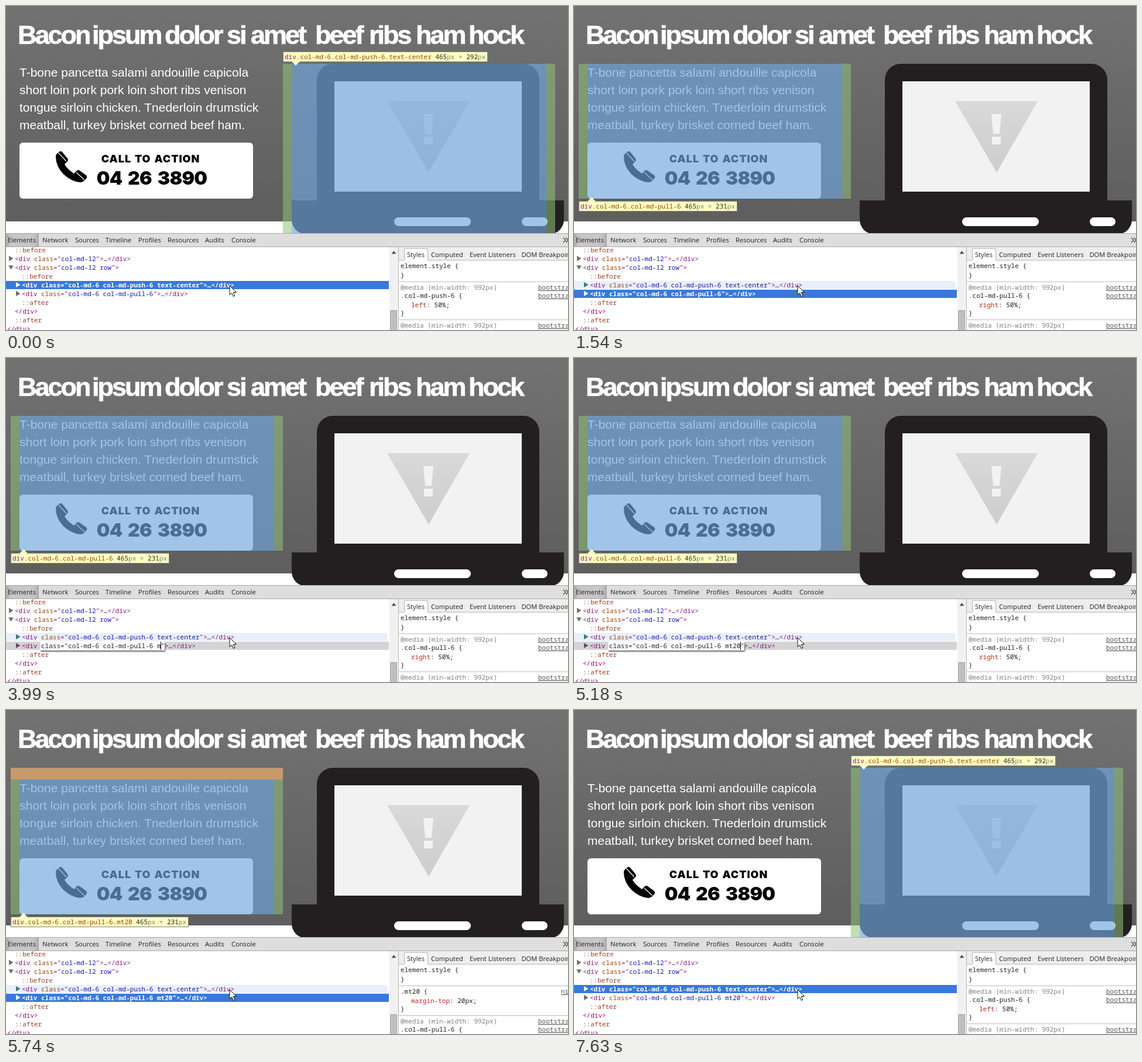
Write an HTML page that moves like this. It is 960 by 555 pixels and loops after 8000 ms.

```html
<!DOCTYPE html>
<html lang="en">
<head>
<meta charset="utf-8">
<title>Editing a class in the inspector</title>
<style>
  html, body { margin: 0; width: 100%; height: 100%; overflow: hidden; background: #fff; }
  svg { display: block; width: 960px; height: 555px; }
  text { white-space: pre; font-kerning: none; }
  .title { font: bold 45px "Liberation Sans", Arial, sans-serif; letter-spacing: -3px; fill: #fff; stroke: #fff; stroke-width: .7px; }
  .copy { font: 21px "Liberation Sans", Arial, sans-serif; fill: #fff; }
  .call { font: 900 18px Inter, "Liberation Sans", sans-serif; letter-spacing: .9px; word-spacing: 1.5px; text-anchor: middle; }
  .phone { font: 900 32px Inter, "Liberation Sans", sans-serif; letter-spacing: -.7px; word-spacing: 4px; text-anchor: middle; }
  .ui { font: 11.15px "Open Sans", "Noto Sans", sans-serif; fill: #222; }
  .mono { font: 11px "Noto Sans Mono", "DejaVu Sans Mono", monospace; fill: #222; }
  .bold { font-weight: bold; }
  .link { text-decoration: underline; fill: #555; }
</style>
</head>
<body>
<svg viewBox="0 0 960 555" xmlns="http://www.w3.org/2000/svg">
  <defs>
    <linearGradient id="hero" x2="0" y2="1"><stop stop-color="#727272"/><stop offset="1" stop-color="#5e5e5e"/></linearGradient>
    <linearGradient id="warn" x2="0" y2="1"><stop stop-color="#d9d9d9"/><stop offset="1" stop-color="#cdcdcd"/></linearGradient>
    <linearGradient id="tab">
      <stop stop-color="#a8a8a8"/><stop offset=".14" stop-color="#c6c6c6"/>
      <stop offset=".86" stop-color="#c6c6c6"/><stop offset="1" stop-color="#a8a8a8"/>
    </linearGradient>
    <filter id="shadow" x="-10%" y="-50%" width="120%" height="220%">
      <feDropShadow dx="1" dy="2" stdDeviation="1.3" flood-color="#000" flood-opacity=".6"/>
    </filter>
  </defs>

  <rect width="960" height="555" fill="#fff"/>
  <rect width="960" height="369" fill="url(#hero)"/>
  <g id="title"></g>

  <g fill="#231f20">
    <path d="M531 340V126a27 27 0 0 1 27-27H884a27 27 0 0 1 27 27V340z"/>
    <path d="M488 333H953V366a25 25 0 0 1-25 25H513a25 25 0 0 1-25-25z"/>
  </g>
  <rect x="561" y="129" width="320" height="189" fill="#f2f2f2"/>
  <path d="M651 163H792L722 285z" fill="url(#warn)"/>
  <path d="M713 185h17l-3 34h-11zM714 224h15v13h-15z" fill="#f2f2f2"/>
  <g fill="#fff">
    <rect x="663" y="362" width="131" height="15" rx="7.5"/>
    <rect x="881" y="362" width="44" height="15" rx="7.5"/>
  </g>

  <g id="column">
    <g id="copy"></g>
    <rect x="23" y="234" width="399" height="96" rx="6" fill="#fff"/>
    <path d="M92 249q2-1 4 1l9 11q2 3 0 5l-5 5q4 8 16 16l5-5q2-2 5 0l11 8q2 2 1 4-5 8-11 8-15-1-29-14-13-14-13-30 0-5 7-9z"/>
    <path d="M89 251l14 15M120 285l14 13" stroke="#fff" stroke-width="1.2"/>
    <text class="call" x="247" y="268">CALL TO ACTION</text>
    <text class="phone" x="249" y="306">04 26 3890</text>
  </g>

  <g id="overlay"></g>

  <rect y="389" width="960" height="166" fill="#fff"/>
  <rect y="389" width="960" height="24" fill="#dedede"/>
  <rect y="390" width="56" height="22" fill="url(#tab)"/>
  <path d="M0 389.5H960M0 412.5H960" stroke="#a8a8a8"/>
  <path d="M952 397l4 4-4 4M956.500 397l4 4-4 4" fill="none" stroke="#555" stroke-width="1.6"/>
  <g id="tabs"></g>

  <g id="tree"></g>

  <rect x="655" y="413" width="15" height="142" fill="#f1f1f1"/>
  <path d="M658.500 424.500l4-5 4 5z" fill="#505050"/>
  <rect x="656.500" y="521.500" width="11" height="40" fill="#bfbfbf" stroke="#a9a9a9"/>
  <rect x="671" y="413" width="289" height="23" fill="#eee"/>
  <path d="M670.500 413V555M671 435.500H960" stroke="#b5b5b5"/>
  <path d="M680.500 436V415.500H720.500V436" fill="#fff" stroke="#b5b5b5"/>
  <g id="sideTabs"></g>
  <g id="styles"></g>

  <path d="M382 479v16l3.700-3.500 2.600 6 2.600-1.100-2.600-5.900h5.200z" fill="#fff" stroke="#111" stroke-linejoin="round"/>
</svg>

<script>
const LOOP = 8000, CHAR = 6.6;
const INK = '#222', TAG = '#881280', NAME = '#994500', VALUE = '#1a1aa6';
const PSEUDO = '#a0452a', GREY = '#808080', PROP = '#b82a1c';

const $ = id => document.getElementById(id);
const esc = s => s.replace(/&/g, '&amp;').replace(/</g, '&lt;');
const rect = (x, y, w, h, fill, more = '') =>
  `<rect x="${x}" y="${y}" width="${w}" height="${h}" fill="${fill}" ${more}/>`;
const shape = (d, fill) => `<path d="${d}" fill="${fill}"/>`;
const label = (x, y, s, cls) => `<text class="${cls}" x="${x}" y="${y}">${esc(s)}</text>`;
const mono = (x, y, parts, cls = '') => `<text class="mono ${cls}" x="${x}" y="${y}">` +
  parts.map(([s, color]) => `<tspan fill="${color}">${esc(s)}</tspan>`).join('') + '</text>';
const labels = (list, y, cls) => list.map(([x, str]) => label(x, y, str, cls)).join('');

// Each step changes some fields of the state and holds until the next.
const steps = [
  [0, { push: 'sel', pull: 'plain', over: 'push', css: 'push', extra: '', shift: 0, caret: 0 }],
  [1470, { push: 'hover', pull: 'sel' }],
  [1540, { over: 'pull', css: 'pull' }],
  [2730, { pull: 'edit', marked: 1 }],
  [3010, { marked: 0, caret: 1 }],
  [3500, { caret: 0 }],
  [3640, { extra: ' ', caret: 1 }],
  [3990, { extra: ' m' }],
  [4270, { extra: ' mt' }],
  [4760, { caret: 0 }],
  [5040, { extra: ' mt2', caret: 1 }],
  [5180, { extra: ' mt20' }],
  [5670, { pull: 'sel', caret: 0, shift: 20 }],
  [5740, { css: 'mt' }],
  [7560, { push: 'sel', pull: 'plain', over: 'push' }],
  [7630, { css: 'push' }]
];

function tooltip(x, y, classes, height, tip) {
  const width = Math.round((classes.length + 17) * CHAR) + 7;
  return rect(x + .5, y + .5, width - 1, 17, '#ffffc2', 'stroke="#808080"') +
    shape(tip, '#ffffc2') +
    mono(x + 3, y + 13, [['div', TAG], [classes, NAME], [' 465', INK], ['px × ', GREY],
      [String(height), INK], ['px', GREY]]);
}

function overlay(s) {
  const push = s.over === 'push';
  const x = push ? 473 : 8, y = push ? 99 : 99 + s.shift, h = push ? 292 : 231;
  const green = 'rgba(147,196,125,.55)';
  let out = rect(x, y, 15, h, green) + rect(x + 450, y, 15, h, green) +
    rect(x + 15, y, 435, h, 'rgba(111,168,220,.66)');
  if (push) return out + tooltip(473, 78, '.col-md-6.col-md-push-6.text-center', 292, 'M488 95h14l-7 7z');
  if (s.shift) out += rect(8, 99, 465, s.shift, 'rgba(246,178,107,.66)');
  // The page takes the typed class only once the edit is committed.
  const classes = '.col-md-6.col-md-pull-6' + (s.shift ? '.mt20' : '');
  return out + tooltip(8, 334 + s.shift, classes, 231, `M23 ${335 + s.shift}h14l-7-8z`);
}

function openTag(x, y, value, closed, white) {
  const c = color => white ? '#fff' : color;
  const parts = [['<div ', c(TAG)], ['class', c(NAME)], ['="', c(TAG)], [value, c(VALUE)], ['">', c(TAG)]];
  if (closed) parts.push(['…', c(INK)], ['</div>', c(TAG)]);
  return mono(x, y, parts, white ? 'bold' : '');
}

function row(y, value, mode) {
  const back = {
    sel: rect(0, y, 654, 14, '#3879d9'),
    hover: shape(`M0 ${y}H648a4 4 0 0 1 4 4v6a4 4 0 0 1-4 4H0z`, '#e9f0fb'),
    edit: rect(0, y, 654, 14, '#d4d4d4'),
    plain: ''
  }[mode];
  const arrow = { sel: '#fff', hover: '#3f776c', edit: '#6b4273', plain: '#6e6e6e' }[mode];
  return back + shape(`M17 ${y + 2}l7.500 4.500-7.500 4.500z`, arrow) + openTag(27, y + 11, value, true, mode === 'sel');
}

function editor(value, s) {
  const width = (value.length + 8) * CHAR;
  const x = 60, y = 497, from = x + 7 * CHAR;
  let out = rect(58, 486, Math.round(width) + 2, 15, '#fff', 'filter="url(#shadow)"');
  if (s.marked) out += rect(106, 486, 145, 14, '#3390ff');
  out += mono(x, y, [['class="', INK], [value, s.marked ? '#fff' : INK], ['"', INK]]);
  if (s.caret) out += rect(Math.floor(from + value.length * CHAR), 486, 1, 14, '#000');
  return out;
}

function tree(s) {
  const value = 'col-md-6 col-md-pull-6' + s.extra;
  const pseudo = (x, y, name) => mono(x, y, [['::' + name, PSEUDO]]);
  const close = (x, y) => mono(x, y, [['</div>', TAG]]);
  return pseudo(15, 422, 'before') +
    shape('M5 428l7.500 4.500-7.500 4.500z', '#6e6e6e') + openTag(15, 437, 'col-md-12', true) +
    shape('M4 444.500h9l-4.500 7z', '#6e6e6e') + openTag(15, 452, 'col-md-12 row', false) +
    pseudo(27, 467, 'before') +
    row(471, 'col-md-6 col-md-push-6 text-center', s.push) +
    row(486, value, s.pull) +
    (s.pull === 'edit' ? editor(value, s) : '') +
    pseudo(27, 512, 'after') + close(15, 527) + pseudo(15, 542, 'after') + close(2, 557);
}

function styles(s) {
  const line = y => rect(671, y, 289, 1, '#bbb');
  const text = (x, y, str, color = INK) => mono(x, y, [[str, color]]);
  const link = (x, y, str) => label(x, y, str, 'mono link');
  const media = y => text(674, y, '@media (min-width: 992px)', GREY) + link(909, y, 'bootstrap.css');
  const decl = (y, name, val) => mono(692, y, [[name, PROP], [`: ${val};`, INK]]);
  const selector = (y, name) => text(674, y, name + ' {') + link(909, y, 'bootstrap.css');
  const head = text(674, 449, 'element.style {') + text(674, 465, '}') + line(472);
  if (s.css === 'mt') {
    return head + text(674, 486, '.mt20 {') + link(948, 486, 'ni') + decl(502, 'margin-top', '20px') +
      text(674, 516, '}') + line(523) + media(537) + selector(551, '.col-md-pull-6');
  }
  return head + media(486) + selector(500, `.col-md-${s.css}-6`) +
    decl(516, s.css === 'push' ? 'left' : 'right', '50%') + text(674, 530, '}') + line(537) + media(551);
}

$('title').innerHTML = labels([[20, 'Bacon'], [147, 'ipsum'], [271, 'dolor'], [377, 'si'], [418, 'amet'],
  [528, 'beef'], [620, 'ribs'], [700, 'ham'], [790, 'hock']], 65, 'title');

$('copy').innerHTML = [
  'T-bone pancetta salami andouille capicola',
  'short loin pork pork loin short ribs venison',
  'tongue sirloin chicken. Tnederloin drumstick',
  'meatball, turkey brisket corned beef ham.'
].map((str, i) => label(23, 121 + 30 * i, str, 'copy')).join('');

$('tabs').innerHTML = labels([[3, 'Elements'], [62, 'Network'], [118, 'Sources'], [170, 'Timeline'],
  [226, 'Profiles'], [276, 'Resources'], [340, 'Audits'], [385, 'Console']], 405, 'ui');
$('sideTabs').innerHTML = labels([[685, 'Styles'], [726, 'Computed'], [792, 'Event Listeners'],
  [880.5, 'DOM Breakpoints']], 430, 'ui');

let shown = -1;
const start = performance.now();

function draw(now) {
  const t = Math.max(0, now - start) % LOOP;
  const passed = steps.filter(([at]) => at <= t);
  if (passed.length !== shown) {
    shown = passed.length;
    const s = Object.assign({}, ...passed.map(([, change]) => change));
    $('column').setAttribute('transform', `translate(0 ${s.shift})`);
    $('overlay').innerHTML = overlay(s);
    $('tree').innerHTML = tree(s);
    $('styles').innerHTML = styles(s);
  }
  requestAnimationFrame(draw);
}
draw(start);
</script>
</body>
</html>
```
